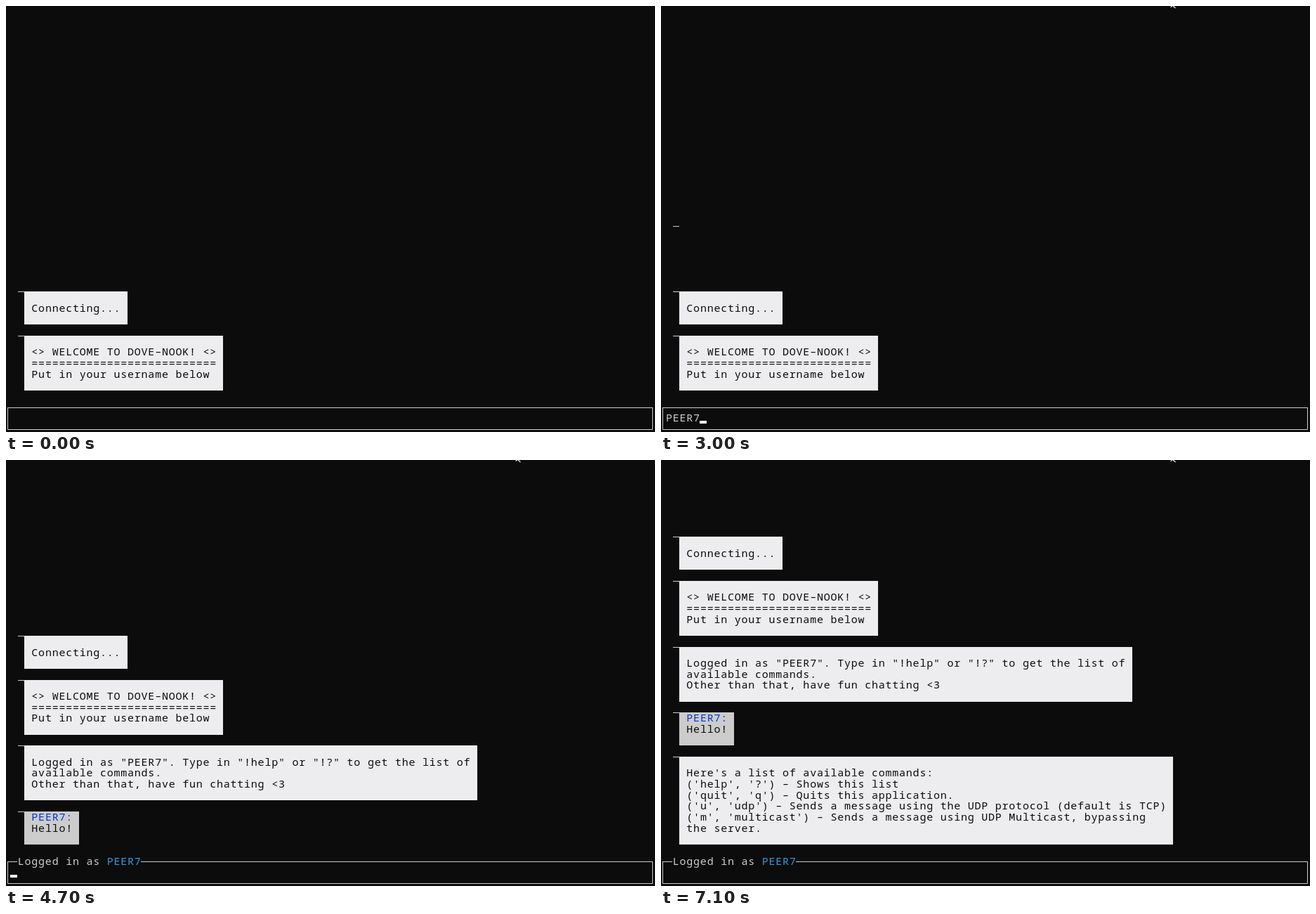
These frames come from a looping animation (924 by 606 pixels, 7200 ms). An HTML page:

```html
<!DOCTYPE html>
<html lang="en">
<head>
<meta charset="utf-8">
<title>Terminal chat</title>
<style>
  html, body { margin: 0; width: 100%; height: 100%; overflow: hidden; background: #0c0c0c; }
  svg { display: block; width: 924px; height: 606px; }
  text {
    font: 15px "Noto Sans Mono", "DejaVu Sans Mono", monospace;
    letter-spacing: 0.766px;
    white-space: pre;
    fill: #0c0c0c;
  }
  .light { fill: #ccc; }
  .title { fill: #3a96dd; }
  .author { fill: #0037da; }
  .frame { fill: none; stroke: #ccc; }
  .pointer { fill: none; stroke: #eee; stroke-width: 1.3; animation: appear 7200ms step-end infinite; }
  @keyframes appear {
    0% { visibility: hidden; }
    19.444%, 100% { visibility: visible; }
  }
</style>
</head>
<body>
<svg id="screen" viewBox="0 0 924 606"></svg>
<script>
const LOOP = 7200;
const CELL = 9.766, ROW = 15.63;
const LEFT = -3.1, INPUT_TOP = 578.75;
const USER = "PEER7";

const screen = document.getElementById("screen");
const colX = c => LEFT + c * CELL;
const rowY = r => INPUT_TOP + r * ROW;

function add(parent, tag, attrs, content = "") {
  const el = document.createElementNS("http://www.w3.org/2000/svg", tag);
  for (const key in attrs) el.setAttribute(key, attrs[key]);
  el.textContent = content;
  parent.append(el);
  return el;
}

function write(parent, content, x, top, cls = "") {
  return add(parent, "text", { x: x + 0.38, y: top + 12.4, class: cls }, content);
}

const show = (el, on) => el.setAttribute("visibility", on ? "visible" : "hidden");

const messages = [
  { lines: ["Connecting..."] },
  { lines: [
    "<> WELCOME TO DOVE–NOOK! <>",
    "=".repeat(27),
    "Put in your username below"
  ] },
  { lines: [
    `Logged in as "${USER}". Type in "!help" or "!?" to get the list of`,
    "available commands.",
    "Other than that, have fun chatting <3"
  ] },
  { author: USER + ":", lines: ["Hello!"] },
  { lines: [
    "Here's a list of available commands:",
    "('help', '?') – Shows this list",
    "('quit', 'q') – Quits this application.",
    "('u', 'udp') – Sends a message using the UDP protocol (default is TCP)",
    "('m', 'multicast') – Sends a message using UDP Multicast, bypassing",
    "the server."
  ] }
];

function drawTick(parent, row) {
  return add(parent, "rect", { x: 17, y: Math.floor(rowY(row)), width: 9, height: 1, fill: "#ccc" });
}

// Draws the newest messages upwards from the input box.
const log = add(screen, "g", {});
function drawLog(count) {
  log.replaceChildren();
  let bottom = -2;
  for (const { author, lines } of messages.slice(0, count).reverse()) {
    const top = bottom - lines.length - 2;
    const cols = Math.max(...lines.map(line => line.length)) + 2;
    const y = Math.floor(rowY(top));
    drawTick(log, top);
    add(log, "rect", {
      x: 26, y,
      width: Math.round(colX(3) + cols * CELL) - 26,
      height: Math.floor(rowY(bottom)) - y,
      fill: author ? "#ccc" : "#ededef"
    });
    if (author) write(log, author, colX(4), rowY(top), "author");
    lines.forEach((line, i) => write(log, line, colX(4), rowY(top + 1 + i)));
    bottom = top - 1;
  }
}

const earlyTick = drawTick(screen, -17);

add(screen, "path", { class: "frame", d: "M2.5 571.5V602.5H920.5V571.5" });
const plainTop = add(screen, "path", { class: "frame", d: "M2 571.5H921" });
const titled = add(screen, "g", {});
add(titled, "path", { class: "frame", d: "M2 571.5H16M192 571.5H921" });
write(titled, "Logged in as ", colX(2), rowY(-1), "light");
write(titled, USER, colX(15), rowY(-1), "title");

const input = write(screen, "", colX(1), rowY(0), "light");
const cursor = add(screen, "rect", { y: 590, width: 10, height: 4, fill: "#f2f2f2" });
add(screen, "path", { class: "pointer", d: "M725.5 1.5L728 0M729 0L732.5 3" });

// Each step: time, messages shown, typed text, cursor on.
const steps = [[0, 2, "", false]];
function type(word, count, times) {
  times.forEach((time, i) => steps.push([time, count, word.slice(0, i + 1), true]));
}
type(USER, 2, [2300, 2400, 2500, 2600, 2800]);
steps.push([3100, 3, "", true]);
type("Hello!", 3, [3300, 3600, 3700, 3800, 3900, 4300]);
steps.push([4400, 3, "Hello!", false], [4700, 4, "", true]);
type("!help", 4, [5200, 5400, 5500, 5600, 5700]);
steps.push([5900, 5, "", true], [6500, 5, "", false]);

let shownStep, shownCount;
function render(time) {
  show(earlyTick, time >= 3000 && time < 3100);
  const step = steps.findLast(s => s[0] <= time);
  if (step === shownStep) return;
  shownStep = step;
  const [, count, typed, blink] = step;
  if (count !== shownCount) {
    drawLog(count);
    show(plainTop, count < 3);
    show(titled, count >= 3);
    shownCount = count;
  }
  input.textContent = typed;
  cursor.setAttribute("x", Math.floor(colX(1 + typed.length)));
  show(cursor, blink);
}

const start = performance.now();
function tick() {
  render((performance.now() - start) % LOOP);
  requestAnimationFrame(tick);
}
tick();
</script>
</body>
</html>
```
